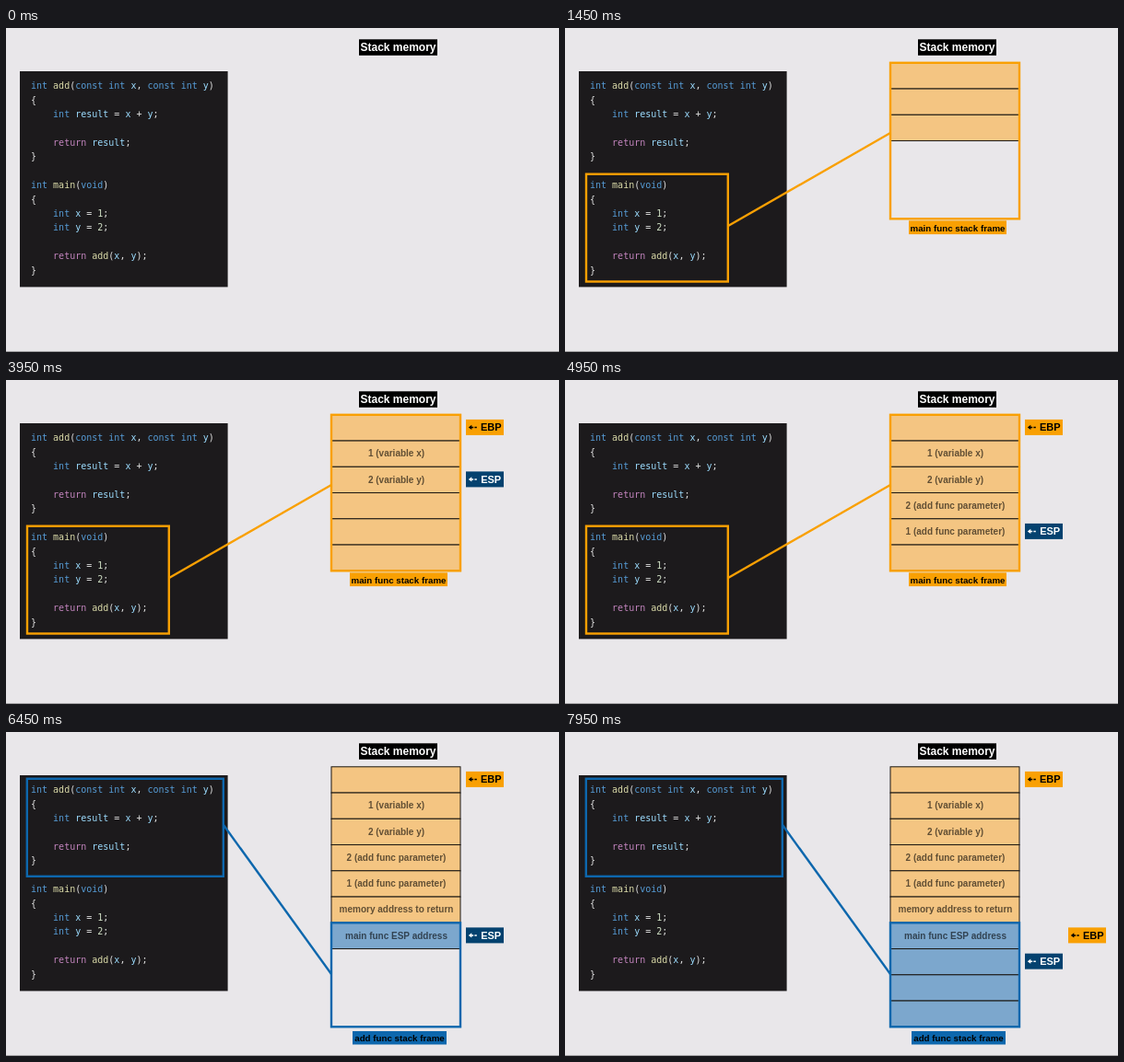
Write an HTML page that moves like this. It is 600x352 px and loops after 8000 ms.

```html
<!DOCTYPE html>
<html lang="en">
<head>
<meta charset="utf-8">
<title>Stack memory</title>
<style>
  html, body { margin: 0; width: 100%; height: 100%; overflow: hidden; background: #e9e7ea; }
  svg { display: block; width: 600px; height: 352px; }
  text { font: bold 10px "Liberation Sans", Arial, sans-serif; text-anchor: middle; }
  .code { font: 10px "DejaVu Sans Mono", monospace; text-anchor: start; white-space: pre; fill: #e0e0e0; }
  .type { fill: #569cd6; }
  .func { fill: #dcdcaa; }
  .name { fill: #9cdcfe; }
  .num { fill: #cfdfc4; }
  .flow { fill: #c586c0; }
</style>
</head>
<body>
<svg id="stage" viewBox="0 0 600 352"></svg>
<script>
const LOOP = 8000, ROW = 28.25, TOP = 37.8, LEFT = 353, WIDTH = 140;
const ORANGE = '#f9a003', BLUE = '#0d67ad', NAVY = '#04426f';
const CALL = 5950; // the call enters add()
const stage = document.getElementById('stage');
const rowY = row => TOP + ROW * row;

const rect = (x, y, w, h, fill, extra = '') =>
  `<rect x="${x}" y="${y}" width="${w}" height="${h}" fill="${fill}" ${extra}/>`;
const text = (x, y, str, size, fill, extra = '') =>
  `<text x="${x}" y="${y}" style="font-size:${size}px" fill="${fill}" ${extra}>${str}</text>`;
const outline = (x, y, w, h, color) =>
  rect(x, y, w, h, 'none', `stroke="${color}" stroke-width="2.4"`);
const line = (x1, y1, x2, y2, color) =>
  `<path d="M${x1} ${y1}L${x2} ${y2}" stroke="${color}" stroke-width="2.4"/>`;

// Adds a group that is visible from one time to another
const timed = [];
function show(markup, from = 0, to = LOOP) {
  const g = document.createElementNS('http://www.w3.org/2000/svg', 'g');
  g.innerHTML = markup;
  stage.append(g);
  timed.push({ g, from, to });
  return g;
}

// Register tag, drawn around its own left middle
const tag = (name, back, ink) => rect(0, -8.5, 41, 17, back) +
  `<path d="M2.8 0L6.3 -2.6V2.6Z" fill="${ink}"/>` +
  `<path d="M6 0H8.2M9.4 0H11.8" stroke="${ink}" stroke-width="1.5"/>` +
  text(27.2, 4, name, 11, ink);
const place = (g, x, row) =>
  g.setAttribute('transform', `translate(${x} ${rowY(row) + 13.6})`);

const source = `int add(const int x, const int y)
{
    int result = x + y;

    return result;
}

int main(void)
{
    int x = 1;
    int y = 2;

    return add(x, y);
}`;
const kinds = [
  ['type', /^(int|const|void)$/], ['func', /^(add|main)$/],
  ['flow', /^return$/], ['num', /^\d+$/], ['name', /./]
];
const paint = code => code.replace(/\w+/g, word =>
  `<tspan class="${kinds.find(k => k[1].test(word))[0]}">${word}</tspan>`);

// Fixed parts
show(rect(0, 351, 600, 1, '#a2a1a3') +
  rect(15, 47, 225.6, 234.4, '#1c1a1c') +
  source.split('\n').map((code, i) =>
    `<text class="code" x="27" y="${66.3 + i * 15.4}">${paint(code)}</text>`).join('') +
  rect(383, 12.3, 85, 17.5, '#000') + text(425.5, 25.3, 'Stack memory', 12, '#fff'));

// Cells of both stack frames
const cellTimes = [950, 1200, 1450, 1700, 1950, 2200, 6350, 7050, 7300, 7600];
cellTimes.forEach((time, row) => show(
  rect(LEFT, rowY(row), WIDTH, ROW, row < 6 ? '#f4c582' : '#7ca7cd',
    'stroke="#181410" stroke-width="1"'), time));

const labels = [
  ['1 (variable x)', 3250], ['2 (variable y)', 3800],
  ['2 (add func parameter)', 4300], ['1 (add func parameter)', 4800],
  ['memory address to return', 5350], ['main func ESP address', 6350]
];
labels.forEach(([str, time], i) => show(
  text(423.5, rowY(i + 1) + 17.3, str, 10, '#000', 'opacity=".6"'), time));

// Frame of main()
show(outline(23, 158.7, 153.8, 116.8, ORANGE), 50, CALL);
show(line(177, 215, LEFT, 114, ORANGE), 350, CALL);
show(outline(LEFT, rowY(0), WIDTH, ROW * 6, ORANGE) +
  rect(373, 209.3, 106, 14.8, ORANGE) +
  text(426, 220.6, 'main func stack frame', 9.75, '#000'), 650, CALL);

// Frame of add()
show(outline(22.8, 50.8, 213, 106, BLUE), CALL);
show(line(236, 101, LEFT, 263, BLUE), CALL + 100);
show(outline(LEFT, rowY(6), WIDTH, ROW * 4, BLUE) +
  rect(376, 325, 102, 14.5, BLUE) +
  text(427, 336, 'add func stack frame', 9.75, '#000'), CALL + 200);

// Registers
place(show(tag('EBP', ORANGE, '#000'), 2500), 499, 0);
place(show(tag('EBP', ORANGE, '#000'), 6650), 546, 6);
const esp = show(tag('ESP', NAVY, '#fff'), 2850);
const espTimes = [2850, 3250, 3800, 4300, 4800, 5350, 6350, 7050];

function draw() {
  const t = performance.now() % LOOP;
  for (const { g, from, to } of timed)
    g.style.display = t >= from && t < to ? '' : 'none';
  const row = Math.max(0, espTimes.filter(time => t >= time).length - 1);
  place(esp, row ? 499 : 546, row);
  requestAnimationFrame(draw);
}
draw();
</script>
</body>
</html>
```
